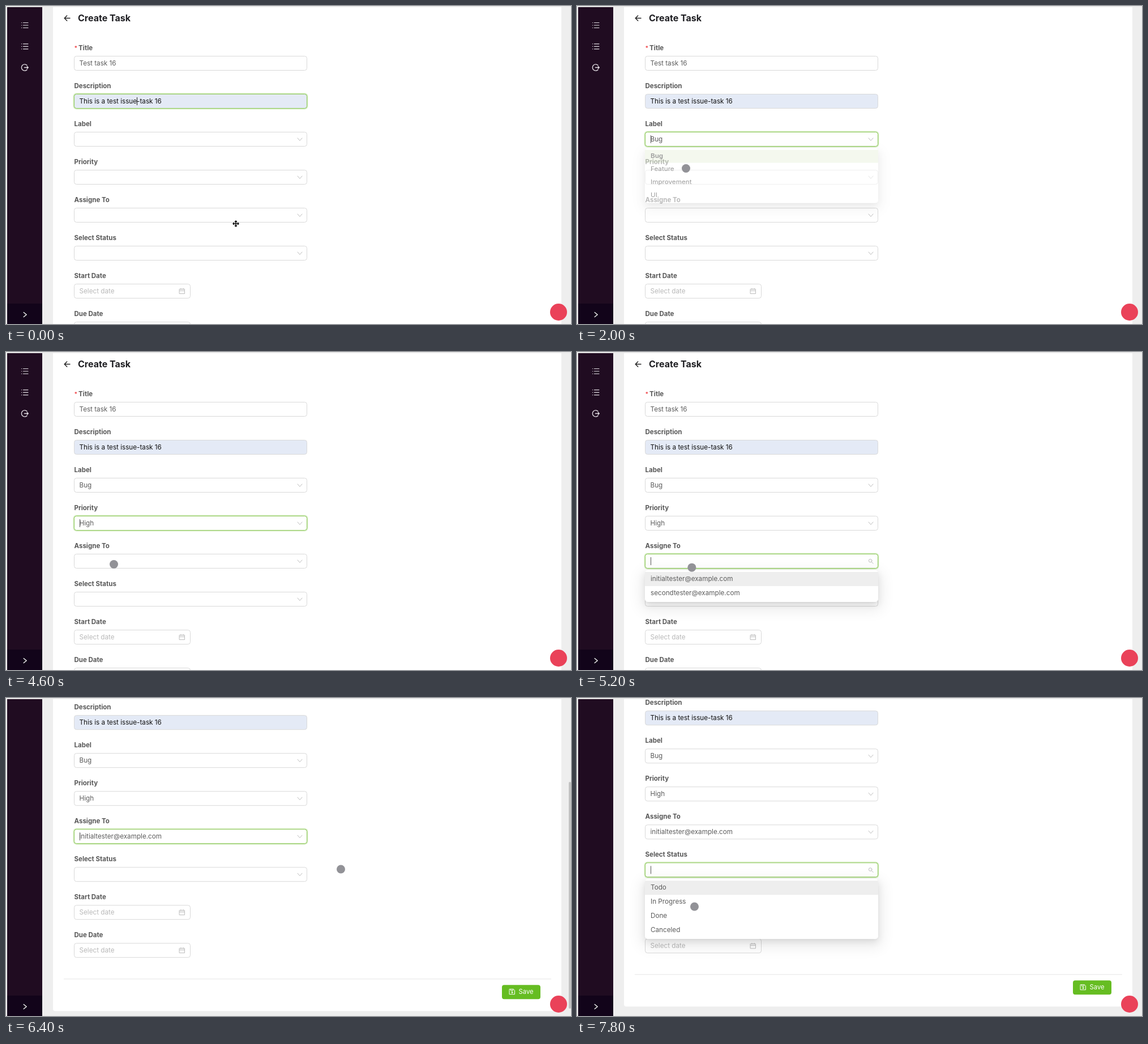
Recreate the animation shown at these times as an HTML page. Size 998 by 561 pixels, loop 8 s.

```html
<!DOCTYPE html>
<html lang="en">
<head>
<meta charset="utf-8">
<title>Create Task</title>
<style>
  html, body { margin: 0; width: 100%; height: 100%; overflow: hidden; background: #eee; }
  body { font: 11.7px/24px Inter, "Open Sans", sans-serif; color: #5c5c5c; }
  div, svg, span { position: absolute; box-sizing: border-box; white-space: nowrap; }
  svg { fill: none; stroke-linecap: round; stroke-linejoin: round; overflow: visible; }
  #stage { left: 0; top: 0; width: 998px; height: 561px; overflow: hidden; background: #eee; }
  #sidebar { left: 1.5px; top: 0; width: 62.7px; height: 561px; background: #200c21; }
  #fold { left: 1.5px; top: 525px; width: 62.7px; height: 36px; background: #12041a; }
  #page { left: 0; top: 0; width: 998px; height: 700px; }
  #card { left: 83px; top: -20px; width: 898px; height: 697px; background: #fff; border-radius: 0 0 4px 4px; }
  h1 { position: absolute; left: 127px; top: 9px; margin: 0; font-size: 16px; line-height: 24px; font-weight: 650; color: #1e1e22; }
  .label { left: 120.5px; font-size: 11.5px; font-weight: 700; color: #585858; }
  .label i { color: #f0484c; font-size: 10px; font-style: normal; margin-right: 2px; }
  .field { left: 120px; width: 412px; height: 26px; padding-left: 8.5px; background: #fff; border: 1px solid #d9d9d9; border-radius: 4.5px; }
  .date { width: 206px; color: #b9b9b9; }
  .filled { background: #e4eaf6; color: #111; }
  .focus { border-color: #93cb62; box-shadow: 0 0 0 .5px #b5dc94, 0 0 0 1.7px rgba(103, 190, 35, .16); }
  .caret { left: 9px; top: 5px; width: 1px; height: 14px; background: #555; visibility: hidden; }
  .focus .caret { visibility: visible; }
  .filled .caret { left: 109.5px; background: #222; }
  .mark { left: 392px; top: 6px; stroke: #bdbdbd; stroke-width: 1; }
  .menu { left: 120px; width: 412px; padding: 3px 0; background: #fff; border-radius: 5px; transform-origin: top; z-index: 2;
    box-shadow: 0 5px 13px rgba(0, 0, 0, .09), 0 2px 5px -3px rgba(0, 0, 0, .14), 0 8px 24px 8px rgba(0, 0, 0, .065); }
  .menu span { position: static; display: block; height: 25px; line-height: 24.5px; padding-left: 10px; }
  .menu .active { background: #eee; }
  .menu .chosen { background: #edf5e4; font-weight: 600; }
  #rule { left: 102px; top: 620px; width: 861px; height: 1px; background: #e6e6e6; }
  #save { left: 876px; top: 630.5px; width: 67.5px; height: 25px; padding-left: 29.5px; font-size: 11.3px; line-height: 25px; border-radius: 4px; background: #66bd22; color: #fff; }
  #thumb { left: 993.5px; width: 4px; height: 400px; border-radius: 2px; background: #c3c3c3; }
  #badge { left: 961px; top: 525px; width: 30px; height: 30px; border-radius: 50%; background: #ea4259; }
  #top { left: 0; top: 0; width: 998px; height: 2px; background: #e9e9e9; }
  #left { left: 0; top: 0; width: 1.5px; height: 561px; background: #f2f2f2; }
  #dot { left: -7.5px; top: -7.5px; width: 15px; height: 15px; border-radius: 50%; background: #929297; }
  #cross { left: 0; top: 0; stroke: #111; stroke-width: 1.6; }
</style>
</head>
<body>
<div id="stage">
  <div id="sidebar"></div>
  <div id="page">
    <div id="card"></div>
    <svg width="64" height="130" stroke="#e2dde3" stroke-width="1.2">
      <path id="list" d="M30.5 29.5h8.5M30.5 34h8.5M30.5 38.5h8.5M27.5 29.5h.3M27.5 34h.3M27.5 38.5h.3"/>
      <use href="#list" y="37.3"/>
      <path d="M37 104.6a5.6 5.6 0 1 0 0 7.8M32.5 108.5h6.5M37.3 106.6l2 1.9-2 1.9" stroke-width="1.4"/>
    </svg>
    <svg width="120" height="40" stroke="#222" stroke-width="1.4"><path d="M113 21.5h-9.5M107.7 17l-4.5 4.5 4.5 4.5"/></svg>
    <h1>Create Task</h1>
    <div id="rule"></div>
    <div id="save">Save
      <svg style="left:13px;top:7.5px" width="10" height="10" stroke="#fff"><path d="M.5.5h7l2 2v7h-9zM2.8.5v2.7h3.6V.5"/><circle cx="5" cy="6.3" r="1.2"/></svg>
    </div>
  </div>
  <div id="fold"><svg width="62" height="36" stroke="#fff" stroke-width="1.3"><path d="M29.2 15.5l5 4-5 4"/></svg></div>
  <div id="thumb"></div>
  <div id="badge"></div>
  <div id="top"></div>
  <div id="left"></div>
  <div id="pointer">
    <div id="dot"></div>
    <svg id="cross" width="1" height="1"><path d="M-5 0H5M0-5V5M-3.6-1.4L-5 0l1.4 1.4M3.6-1.4L5 0 3.6 1.4M-1.4-3.6L0-5l1.4 1.4M-1.4 3.6L0 5l1.4-1.4"/></svg>
  </div>
</div>
<script>
const LOOP = 8000, STEP = 200, PITCH = 67, FADE = 250;
const $ = id => document.getElementById(id);

const rows = [
  { label: 'Title', text: 'Test task 16' },
  { label: 'Description', text: 'This is a test issue-task 16', kind: 'filled', open: 0 },
  { label: 'Label', options: ['Bug', 'Feature', 'Improvement', 'UI'], open: 900, close: 1900, pick: 0 },
  { label: 'Priority', options: ['No priority', 'Urgent', 'High', 'Medium', 'Low'], open: 2700, close: 4300, pick: 2 },
  { label: 'Assigne To', options: ['initialtester@example.com', 'secondtester@example.com'], open: 4900, close: 5700, pick: 0 },
  { label: 'Select Status', options: ['Todo', 'In Progress', 'Done', 'Canceled'], open: 7300, close: Infinity, pick: 0 },
  { label: 'Start Date', text: 'Select date', kind: 'date' },
  { label: 'Due Date', text: 'Select date', kind: 'date' }
];

// Each stop: time, then the values reached at that time.
const pointerPath = [[0, 406, 384], [400, 406, 384], [1000, 250, 237], [1600, 186, 264], [2000, 192, 286],
  [2600, 205, 302], [3200, 177, 360], [3800, 180, 383], [4200, 182, 383], [4600, 190, 374], [5000, 196, 370],
  [5600, 215, 399], [6000, 549.5, 444], [6400, 591, 301.5], [6800, 591, 301.5], [7400, 240, 305], [7800, 207, 367.5]];
const scrollPath = [[6000, 0], [6200, 72], [6400, 124.8], [6600, 131.5], [6800, 132.7]];
const thumbFade = [[6000, 0], [6200, 1], [6800, 1], [7200, 0]];

const ARROW = 'M2 4l4 4.5 4-4.5';
const SEARCH = 'M7.5 7.5l2.7 2.7M8 5.2a2.8 2.8 0 1 0-5.6 0 2.8 2.8 0 0 0 5.6 0';
const CALENDAR = 'M1.5 2.5h9v8h-9zM1.5 5.3h9M4 1v2.4M8 1v2.4';

const clamp = x => Math.max(0, Math.min(1, x));

function along(path, time) {
  const next = path.findIndex(stop => stop[0] > time);
  if (next === 0) return path[0].slice(1);
  if (next < 0) return path[path.length - 1].slice(1);
  const a = path[next - 1], b = path[next], k = (time - a[0]) / (b[0] - a[0]);
  return a.slice(1).map((v, i) => v + (b[i + 1] - v) * k);
}

function add(className, top, html) {
  const el = document.createElement('div');
  el.className = className;
  el.style.top = top + 'px';
  el.innerHTML = html;
  $('page').append(el);
  return el;
}

const icon = (d, left = 392) =>
  `<svg class="mark" style="left:${left}px" width="12" height="12"><path d="${d}"/></svg>`;

rows.forEach((row, i) => {
  row.top = 88 + PITCH * i;
  add('label', row.top - 26.5, (i ? '' : '<i>*</i>') + row.label);
  const end = row.options ? icon(ARROW) : row.kind === 'date' ? icon(CALENDAR, 184) : '';
  row.field = add('field ' + (row.kind || ''), row.top,
    `<span class="value">${row.text || ''}</span><div class="caret"></div>${end}`);
  if (row.options) {
    row.menu = add('menu', row.top + 29, row.options.map(o => `<span>${o}</span>`).join(''));
    row.value = row.field.querySelector('.value');
    row.mark = row.field.querySelector('path');
  }
});

function drawSelect(row, time, hoverY) {
  const closed = time >= row.close;
  const shown = closed ? 1 - clamp((time - row.close) / FADE) : clamp((time - row.open) / FADE);
  row.value.textContent = closed ? row.options[row.pick] : '';
  row.mark.setAttribute('d', time >= row.open && !closed ? SEARCH : ARROW);
  row.menu.style.opacity = shown;
  row.menu.style.visibility = shown ? 'visible' : 'hidden';
  row.menu.style.transform = `scaleY(${0.78 + 0.22 * shown})`;
  const over = Math.floor((hoverY - row.top - 32) / 25);
  const active = over >= 0 && over < row.options.length ? over : 0;
  [...row.menu.children].forEach((option, i) => {
    option.className = closed ? (i === row.pick ? 'chosen' : '') : i === active ? 'active' : '';
  });
}

function draw(time) {
  const [scroll] = along(scrollPath, time);
  const [x, y] = along(pointerPath, time);
  const hoverY = along(pointerPath, time - STEP)[1] + scroll;
  const focused = rows.filter(row => row.open <= time).pop();
  $('page').style.transform = `translateY(${-scroll}px)`;
  rows.forEach(row => {
    row.field.classList.toggle('focus', row === focused);
    if (row.options) drawSelect(row, time, hoverY);
  });
  $('thumb').style.top = 23 + scroll + 'px';
  $('thumb').style.opacity = along(thumbFade, time)[0];
  $('pointer').style.transform = `translate(${x}px, ${y}px)`;
  $('dot').style.visibility = time < 600 ? 'hidden' : 'visible';
  $('cross').style.visibility = time < 600 ? 'visible' : 'hidden';
}

const start = performance.now();
function tick() {
  const time = (performance.now() - start) % LOOP;
  draw(Math.floor(time / STEP) * STEP);
  requestAnimationFrame(tick);
}
tick();
</script>
</body>
</html>
```
